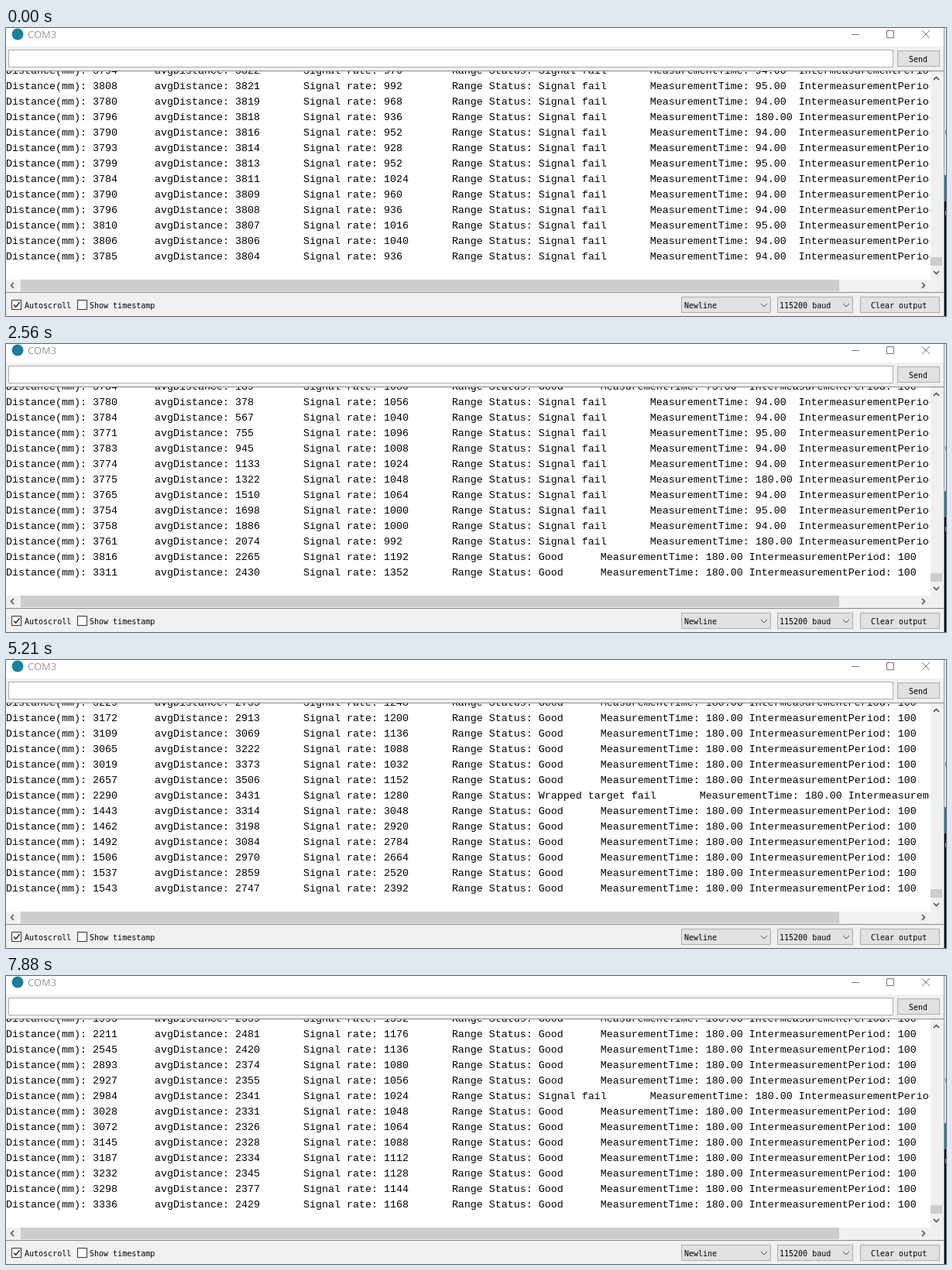
Write an HTML page that moves like this. It is 1214 by 372 pixels and loops after 8 s.

```html
<!DOCTYPE html>
<html lang="en">
<head>
<meta charset="utf-8">
<title>Serial monitor</title>
<style>
  html, body { margin: 0; width: 100%; height: 100%; overflow: hidden; background: #fff; }
  svg { position: absolute; left: 0; top: 0; }
  #view { position: absolute; left: 0; top: 56px; width: 1193px; height: 269px; overflow: hidden; }
  #log { margin: -10px 0 0; font: 13.333px/20px "Liberation Mono", monospace; tab-size: 8; color: #000; }
  .ui { font: 10px "DejaVu Sans Mono", monospace; white-space: pre; }
  .btn { fill: #e1e1e1; stroke: #adadad; }
  .box { fill: #fff; stroke: #333; }
  .icon { fill: none; stroke: #777; }
  .arrow { fill: none; stroke: #505050; stroke-width: 1.6; }
</style>
</head>
<body>
<svg width="1214" height="372" viewBox="0 0 1214 372">
  <rect y="24" width="1211" height="348" fill="#f0f0f0"/>
  <rect y="56" width="1194" height="269" fill="#fff"/>

  <!-- title bar -->
  <circle cx="15" cy="8" r="7.5" fill="#1b7f9c"/>
  <text x="28" y="13" font-family="Open Sans, sans-serif" font-size="13" fill="#999">COM3</text>
  <path class="icon" d="M1092 8.5h10M1137.5 3.5h9v9h-9zM1183 3l10 10M1193 3l-10 10"/>

  <!-- input row -->
  <rect x="3.5" y="28.5" width="1142" height="22" fill="#fff" stroke="#adadad"/>
  <rect class="btn" x="1151.5" y="29.5" width="54" height="20"/>
  <path d="M0 55.5h1211M0 341.5h1211" stroke="#828790"/>

  <!-- scrollbars -->
  <path d="M1194 296h15v11h-15zM19 325h1057v15H19z" fill="#cdcdcd"/>
  <path class="arrow" d="M1198 67l3.5-3.5 3.5 3.5M1198 314l3.5 3.5 3.5-3.5M10 329l-3.5 3.5 3.5 3.5M1183 329l3.5 3.5-3.5 3.5"/>

  <!-- bottom bar -->
  <rect class="box" x="7.5" y="351.5" width="12" height="12"/>
  <rect class="box" x="92.5" y="351.5" width="12" height="12"/>
  <path d="M10 357.5l2.7 3 5-6.5" fill="none" stroke="#222" stroke-width="1.4"/>
  <rect class="btn" x="872.5" y="347.5" width="115" height="20"/>
  <rect class="btn" x="996.5" y="347.5" width="97" height="20"/>
  <rect class="btn" x="1103.5" y="347.5" width="102" height="20"/>
  <path class="icon" d="M975 356l4 4 4-4M1081 356l4 4 4-4" style="stroke:#505050"/>
  <g class="ui">
    <text x="1166" y="44">Send</text>
    <text x="24" y="362">Autoscroll</text>
    <text x="108" y="362">Show timestamp</text>
    <text x="876" y="362">Newline</text>
    <text x="999" y="362">115200 baud</text>
    <text x="1117" y="362">Clear output</text>
  </g>

  <!-- sliver of the desktop behind the window -->
  <rect x="1211" width="3" height="190" fill="#e6e6e6"/>
  <rect x="1211" y="190" width="3" height="34" fill="#1b7f9c"/>
  <rect x="1211" y="224" width="3" height="148" fill="#000"/>
  <path d="M1211.5 0v372" stroke="#999"/>
  <path d="M1213.5 132v6" stroke="#889"/>
  <path d="M1213.5 236v6" stroke="#7ab"/>
</svg>
<div id="view"><pre id="log"></pre></div>

<script>
const LOOP = 8000, ROWS = 13, WINDOW = 20;
const BOOT = 16, BOOT_TIME = 770;          // reading and moment at which the sensor restarts
const FAST = 112, SLOW = 190;              // ms between lines
const FIRST_ARRIVAL = 70;

// [reading, distance, signal rate]: an object comes close, then leaves
const keys = [
  [0, 3794, 976], [15, 3796, 984], [16, 3784, 1080], [26, 3761, 992], [27, 3816, 1192],
  [28, 3311, 1352], [34, 3019, 1032], [36, 2290, 1280], [37, 1443, 3048], [42, 1543, 2392],
  [45, 2211, 1176], [47, 2893, 1080], [49, 2984, 1024], [56, 3336, 1168]];
const READINGS = keys.at(-1)[0] + 1;

// repeatable noise in -1..1
function noise(seed) {
  const x = Math.sin(seed * 12.9898) * 43758.5453;
  return 2 * (x - Math.floor(x)) - 1;
}

// straight line between key points, noisy in between, noisier for far targets
function sample(i) {
  const k = Math.max(1, keys.findIndex(key => key[0] >= i));
  const [from, d0, r0] = keys[k - 1], [to, d1, r1] = keys[k];
  const u = (i - from) / (to - from), rough = u % 1 ? 1 : 0;
  const distance = Math.round(d0 + (d1 - d0) * u + rough * 16 * noise(i));
  const spread = distance > 3700 ? 56 : 8;
  const rate = 8 * Math.round((r0 + (r1 - r0) * u + rough * spread * noise(i + 0.5)) / 8);
  return { distance, rate };
}

function statusOf(i, { distance, rate }, previous) {
  if (i === BOOT) return 'Good';
  if (rate < (distance > 3700 ? 1150 : 1030)) return 'Signal fail';
  const falling = previous - distance > 300;
  return falling && distance < 2400 && rate < 1500 ? 'Wrapped target fail' : 'Good';
}

function measurementTime(i, status) {
  if (i === BOOT) return 75;
  if (status !== 'Signal fail' || i % 19 === 3 || i % 23 === 3) return 180;
  return i % 9 % 5 === 1 ? 95 : 94;
}

const lines = [], arrivals = [];
const history = Array(WINDOW).fill(3824);
let clock = FIRST_ARRIVAL - FAST;
for (let i = 0; i < READINGS; i++) {
  if (i === BOOT) {
    history.fill(0);
    clock = BOOT_TIME;
    for (const line of ['VL53L1X Qwiic Test', 'Sensor online!', '2']) arrivals[lines.push(line) - 1] = clock;
  }
  const reading = sample(i), status = statusOf(i, reading, history.at(-1));
  const time = measurementTime(i, status);
  history.push(reading.distance);
  history.shift();
  const average = Math.floor(history.reduce((sum, d) => sum + d) / WINDOW);
  if (i >= ROWS) clock += time > 100 ? SLOW : FAST;
  arrivals.push(clock);
  lines.push(`Distance(mm): ${reading.distance}\tavgDistance: ${average}\tSignal rate: ${reading.rate}\t` +
    `Range Status: ${status}\tMeasurementTime: ${time}.00\tIntermeasurementPeriod: 100`);
}

// now and then the first part of a line shows up before the rest
const LEAD = 75, HEAD = 30;
const isSplit = line => line % 20 === 15;

const log = document.getElementById('log');
let shown;
function draw(now) {
  const t = now % LOOP;
  let next = ROWS;
  while (arrivals[next] <= t) next++;
  let text = lines.slice(next - ROWS, next).join('\n');
  if (isSplit(next) && t >= arrivals[next] - LEAD) text += '\n' + lines[next].slice(0, HEAD);
  if (text !== shown) log.textContent = shown = text;
  requestAnimationFrame(draw);
}
draw(0);
</script>
</body>
</html>
```
